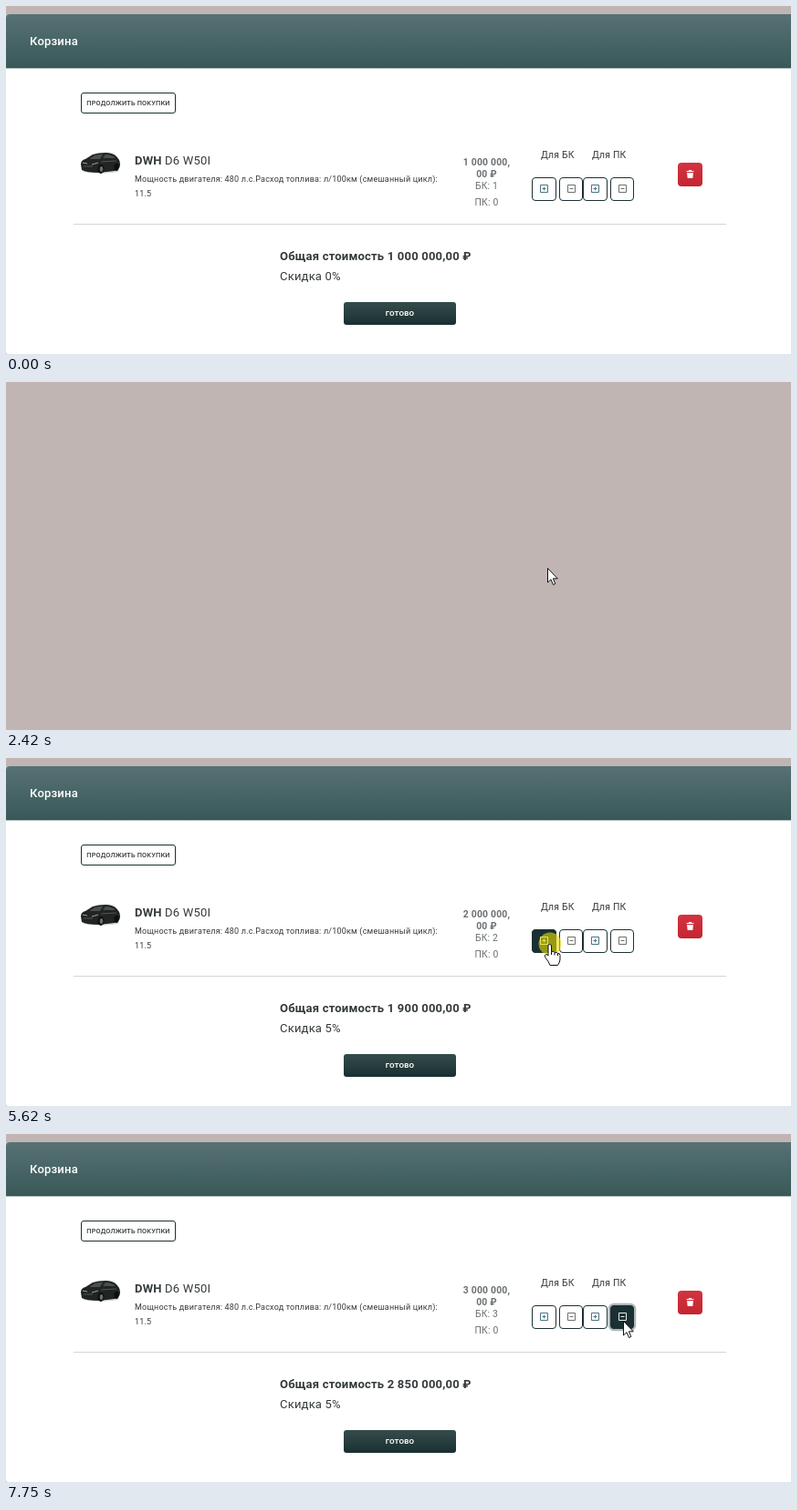
An HTML page for the animation above (8 s loop, 860 px wide and 382 px high).

```html
<!DOCTYPE html>
<html lang="ru">
<head>
<meta charset="utf-8">
<style>
  html, body { margin: 0; width: 100%; height: 100%; overflow: hidden; background: #c1b5b4; }
  svg { display: block; }
  text { font-family: Roboto, sans-serif; letter-spacing: .2px; fill: #343a3c; white-space: pre; }
  .title { font-size: 13px; }
  .label { font-size: 10.4px; }
  .small { font-size: 9px; }
  .muted { fill: #6b7072; }
  .mid { text-anchor: middle; }
  .bold { font-weight: 700; }
  .medium { font-weight: 500; }
  .white { fill: #fff; }
</style>
</head>
<body>
<svg width="860" height="382" viewBox="0 0 860 382">
  <defs>
    <linearGradient id="bar" x2="0" y2="1"><stop stop-color="#577174"/><stop offset="1" stop-color="#395958"/></linearGradient>
    <linearGradient id="dark" x2="0" y2="1"><stop stop-color="#354c4c"/><stop offset="1" stop-color="#1a2f31"/></linearGradient>
    <linearGradient id="red" x2="0" y2="1"><stop stop-color="#d23440"/><stop offset="1" stop-color="#c42531"/></linearGradient>
  </defs>

  <g id="page">
    <path d="M4 9H860V382H2Q0 382 0 379V13Q0 9 4 9Z" fill="#fff"/>
    <path d="M4 9H860V68H0V13Q0 9 4 9Z" fill="url(#bar)"/>
    <path d="M0 68.5H860" stroke="#b5bfbe"/>
    <text class="title medium white" x="26" y="43">Корзина</text>

    <rect x="82.5" y="95.5" width="103" height="22" rx="2.5" fill="#fff" stroke="#1d3033"/>
    <text class="mid medium" x="134" y="109" font-size="7.3">ПРОДОЛЖИТЬ ПОКУПКИ</text>

    <g id="car">
      <ellipse cx="104" cy="181" rx="20" ry="2.5" fill="#d5d5d5"/>
      <path d="M82 174Q82 169 87 168L95 163Q101 161 109 161 117 161 121 165L124 169Q126 174 124 178L119 181 102 183Q88 183 83 180Z" fill="#202423"/>
      <path d="M91 168L97 164Q101 162.500 106 163L103 168ZM106 167L109 163Q116 163 120 167Z" fill="#4a504f"/>
      <path d="M84 172L89 173M94 174L101 172" stroke="#9ca3a2"/>
      <path d="M85 176H95M104 171L121 170" stroke="#515756"/>
      <ellipse cx="104" cy="179" rx="3.500" ry="5" fill="#0c0e0e"/>
      <ellipse cx="104.500" cy="179" rx="1.800" ry="3" fill="#686d6c"/>
      <ellipse cx="121" cy="177" rx="2.500" ry="4" fill="#0c0e0e"/>
    </g>
    <text class="title" x="141" y="174"><tspan class="bold">DWH</tspan> D6 W50I</text>
    <text class="small" x="141" y="193">Мощность двигателя: 480 л.с.Расход топлива: л/100км (смешанный цикл):</text>
    <text class="small" x="141" y="209">11.5</text>

    <text class="label bold muted mid" x="526.5" y="175" id="price"></text>
    <text class="label bold muted mid" x="526.5" y="188">00 ₽</text>
    <text class="label muted mid" x="526.5" y="201" id="count"></text>
    <text class="label muted mid" x="526.5" y="219">ПК: 0</text>
    <text class="label" x="586" y="167">Для БК</text>
    <text class="label" x="642" y="167">Для ПК</text>
    <g id="buttons"></g>

    <rect x="736" y="172" width="27" height="26" rx="4" fill="url(#red)"/>
    <path d="M745.500 182H753.500V181H751V180H748V181H745.500ZM746 183H753L752.300 189H746.700Z" fill="#fff"/>

    <path d="M74 239.500H789" stroke="#d3d6d5"/>
    <text class="title bold" x="300" y="279" id="total"></text>
    <text class="title" x="300" y="301" id="discount"></text>
    <rect x="370" y="325" width="123" height="25" rx="3" fill="url(#dark)"/>
    <text class="bold white mid" x="431.5" y="340" font-size="8">ГОТОВО</text>
  </g>

  <circle id="flash" r="12.500" fill="#e6dc00" fill-opacity=".62"/>
  <g id="cursor" stroke="#111" stroke-linejoin="round" fill="#fff">
    <path id="arrow" d="M.5 .5V16L4 12.700 6.500 18.500 8.800 17.500 6.400 11.800H11.300Z"/>
    <g id="hand">
      <path d="M-2 13V2Q-2 .5-.5 .5T1.500 2V8.500Q4.500 7.500 5 9.500 8 8.500 8.500 10.500 11 10 11 12.500V17Q11 20 8.500 23.500H0Q-1 20-5.500 14.500-6.500 12-4 11.500Q-3 12-2 13Z"/>
      <path d="M1.500 8.500V12M5 9.500V12.500M8.500 10.500V13" fill="none"/>
    </g>
  </g>
</svg>
<script>
const LOOP = 8000, FADE = 150;
const byId = id => document.getElementById(id);
const show = (el, visible) => el.setAttribute('visibility', visible ? 'inherit' : 'hidden');
const within = (t, spans) => spans.some(([from, to]) => t >= from && t < to);

const blank = [[2420, 2620], [5930, 6320]];
const handShown = [[1530, 2420], [3590, 5930], [7270, 7750]];
const clicks = [2010, 5620, 7470];

// time, x, y of the pointer tip
const path = [
  [760, 707, 322], [1390, 600, 220], [1530, 594, 210], [1740, 592.5, 204],
  [3790, 592.5, 204], [4200, 641, 219], [4620, 646, 214], [4900, 679, 207],
  [5420, 596, 204], [5780, 596, 204], [6170, 639, 238], [6600, 639, 238], [7000, 676, 205]
];

const carts = [
  { from: 0, count: 1, total: '1 000 000', discount: 0 },
  { from: 2620, count: 2, total: '1 900 000', discount: 5 },
  { from: 6320, count: 3, total: '2 850 000', discount: 5 }
];

const buttons = [
  { x: 576, w: 27, plus: true, hover: [[1560, 2420], [2620, 4400], [5230, 5930]], focus: [[2080, 2420], [5710, 5930]] },
  { x: 606, w: 26, plus: false, hover: [], focus: [] },
  { x: 632, w: 27, plus: true, hover: [], focus: [] },
  { x: 662, w: 26, plus: false, hover: [[4800, 4960], [6880, LOOP + FADE]], focus: [[7540, LOOP]] }
];

function face({ x, w, plus }, fill, ink) {
  const cx = Math.floor(x + w / 2) + .5;
  return `<rect x="${x + .5}" y="188.5" width="${w - 1}" height="25" rx="3.5" fill="${fill}" stroke="#1b3033"/>
    <path d="M${cx - 4} 196.500h8v8h-8zM${cx - 2} 200.500h4${plus ? `M${cx} 198.500v4` : ''}" fill="none" stroke="${ink}"/>`;
}

byId('buttons').innerHTML = buttons.map(b => `<g>
  <rect x="${b.x - 1}" y="187" width="${b.w + 2}" height="28" rx="5" fill="none" stroke="#1b3033" stroke-opacity=".35" stroke-width="2.5"/>
  <g>${face(b, '#fff', b.plus ? '#4b7482' : '#6c716a')}</g>
  <g>${face(b, '#1b3033', '#e8eeee')}</g></g>`).join('');
buttons.forEach((b, i) => [b.ring, , b.dark] = byId('buttons').children[i].children);

function pointerAt(t) {
  const next = path.findIndex(key => key[0] > t);
  if (next < 1) return path[next ? path.length - 1 : 0].slice(1);
  const [a, b] = [path[next - 1], path[next]];
  const u = (t - a[0]) / (b[0] - a[0]), s = u * u * (3 - 2 * u);
  return [a[1] + (b[1] - a[1]) * s, a[2] + (b[2] - a[2]) * s];
}

const clamp = v => Math.max(0, Math.min(1, v));
const hoverAt = (t, spans) => Math.max(0, ...spans.map(([from, to]) =>
  Math.min(clamp((t - from) / FADE), clamp(1 - (t - to) / FADE))));

function draw() {
  const t = performance.now() % LOOP;
  const [x, y] = pointerAt(t);
  const place = `translate(${Math.round(x)} ${Math.round(y)})`;
  const isHand = within(t, handShown);
  const cart = carts.findLast(c => t >= c.from);

  show(byId('page'), !within(t, blank));
  byId('price').textContent = `${cart.count} 000 000,`;
  byId('count').textContent = `БК: ${cart.count}`;
  byId('total').textContent = `Общая стоимость ${cart.total},00 ₽`;
  byId('discount').textContent = `Скидка ${cart.discount}%`;

  for (const b of buttons) {
    b.dark.setAttribute('opacity', within(t, [[2570, 2620], [6270, 6320]]) ? 0 : hoverAt(t, b.hover));
    show(b.ring, within(t, b.focus));
  }

  show(byId('flash'), clicks.some(c => t >= c && t < c + 150));
  show(byId('cursor'), t >= path[0][0]);
  show(byId('arrow'), !isHand);
  show(byId('hand'), isHand);
  byId('flash').setAttribute('transform', place);
  byId('cursor').setAttribute('transform', place);
  requestAnimationFrame(draw);
}
draw();
</script>
</body>
</html>
```
